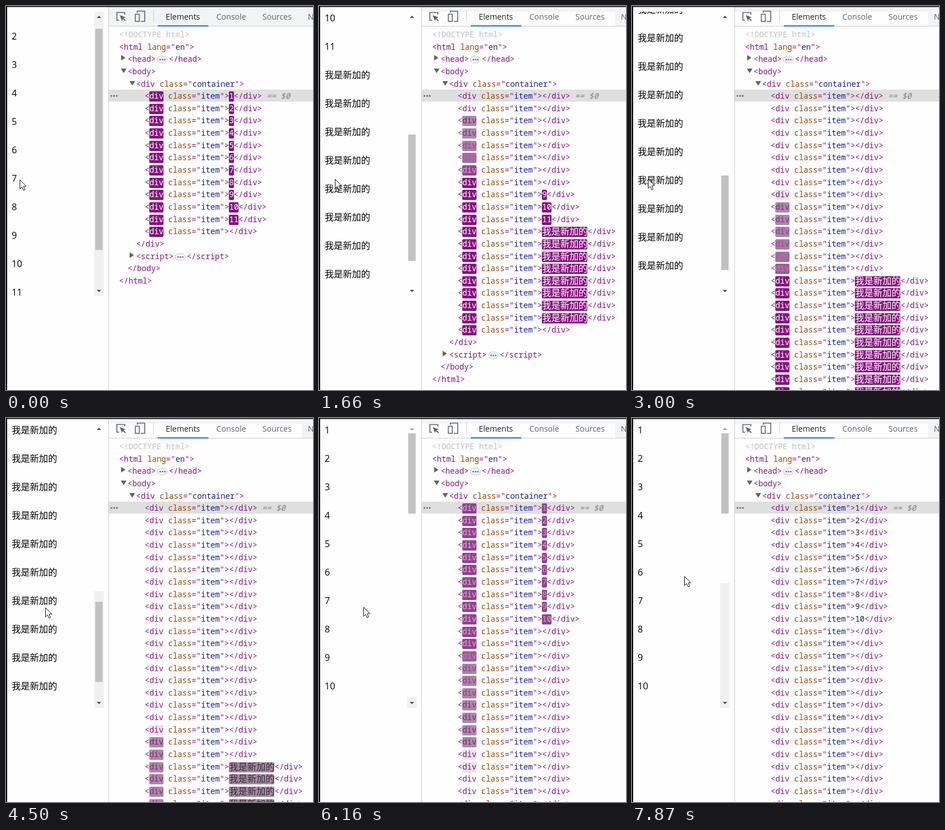
These frames come from a looping animation (540 by 675 pixels, 7.99 s). An HTML page with a canvas:

```html
<!DOCTYPE html>
<html lang="en">
<head>
<meta charset="utf-8">
<style>
html, body { margin: 0; width: 100%; height: 100%; overflow: hidden; background: #fefefe; }
canvas { display: block; }
</style>
</head>
<body>
<canvas id="stage" width="540" height="675"></canvas>
<script>
const ctx = document.getElementById('stage').getContext('2d');
const LOOP = 7990, STEPS = 58, STEP = LOOP / STEPS, FADE = 1250;
const ROW = 21.64, CHAR = 8.25, ITEM = 50, VIEW = 500;
const CJK = '"Noto Sans CJK SC", "Noto Sans CJK JP", "Noto Sans CJK", sans-serif';
const SANS = '"Open Sans", "Noto Sans", ' + CJK;
const MONO = '13.75px "Noto Sans Mono", "DejaVu Sans Mono", monospace';
const PAGE = '#fefefe', TAG = '#881280', ATTR = '#994500', VALUE = '#1a1aa6', INK = '#202124';

// [step, value...] keys, linear in between
const SCROLL = [[0, 18], [2, 110], [12, 450], [18, 750], [21, 815], [22, 905], [25, 1050], [32, 1050],
  [34, 600], [38, 150], [40, 130], [42, 0]];
const POINTER = [[0, 24, 305], [5, 28, 304], [26, 28, 304], [30, 67, 333], [44, 78, 332],
  [49, 408, 167], [56, 123, 290], [57, 92, 278]];
// Top of the painted scrollbar track, held until the next key
const TRACK = [[0, 10], [9, 510], [28, 304], [33, 490], [56, 290]];

function track(keys, k, i = 1) {
  const n = keys.findIndex(key => key[0] > k);
  if (n < 0) return keys[keys.length - 1][i];
  const a = keys[n - 1], b = keys[n];
  return a[i] + (b[i] - a[i]) * (k - a[0]) / (b[0] - a[0]);
}
const hold = (keys, k) => keys.filter(key => key[0] <= k).pop()[1];

// cubic-bezier(0, 0, .2, 1)
function ease(x) {
  if (x <= 0) return 0;
  if (x >= 1) return 1;
  let lo = 0, hi = 1;
  for (let i = 0; i < 20; i++) {
    const u = (lo + hi) / 2;
    if (.6 * u * u * (1 - u) + u * u * u < x) lo = u; else hi = u;
  }
  return lo * lo * (3 - 2 * lo);
}
function mix(a, b, p) {
  const part = (c, i) => parseInt(c.substr(1 + 2 * i, 2), 16);
  return 'rgb(' + [0, 1, 2].map(i => Math.round(part(a, i) + (part(b, i) - part(a, i)) * p)) + ')';
}
const label = n => n <= 11 ? String(n) : '我是新加的';

// State of the virtual list at every step; the rows follow the scroll one step late
function build() {
  const out = [];
  let old = null;
  for (let k = 0; k < STEPS; k++) {
    const scroll = Math.round(track(SCROLL, k));
    const base = k ? old.scroll : scroll;
    const first = Math.floor(base / ITEM) + 1, last = Math.ceil((base + VIEW) / ITEM);
    const count = Math.max(old ? old.count : 0, last + 1);
    const flash = old ? old.flash.slice() : [];
    for (let n = 1; n <= count; n++) {
      const inside = n >= first && n <= last;
      const left = old && n >= old.first && n <= old.last && !inside;
      const added = !old || n > old.count;
      if (added || left || (inside && old.base !== base)) flash[n] = k;
    }
    const total = Math.max(old ? old.total : 0, (Math.floor((scroll + VIEW) / ITEM) + 2) * ITEM);
    out.push(old = { k, scroll, base, first, last, count, flash, total });
  }
  return out;
}
const states = build();

function rect(x, y, w, h, color, r = 0) {
  ctx.fillStyle = color;
  ctx.beginPath();
  ctx.roundRect(x, y, w, h, r);
  ctx.fill();
}
function poly(points, fill, stroke) {
  ctx.beginPath();
  points.forEach(p => ctx.lineTo(p[0], p[1]));
  ctx.closePath();
  if (fill) { ctx.fillStyle = fill; ctx.fill(); }
  if (stroke) { ctx.strokeStyle = stroke; ctx.lineWidth = 1; ctx.stroke(); }
}
function line(points, color, width) {
  ctx.strokeStyle = color;
  ctx.lineWidth = width;
  ctx.beginPath();
  points.forEach(p => ctx.lineTo(p[0], p[1]));
  ctx.stroke();
}
function text(s, x, y, color, font) {
  ctx.font = font;
  ctx.fillStyle = color;
  ctx.fillText(s, x, y);
}
// Draws [string, colour] pairs on one code line and returns the end
function code(x, y, ...parts) {
  for (const [s, color] of parts) {
    text(s, x, y + 5, color, MONO);
    x += s.length * CHAR;
  }
  return x;
}
const lineY = n => Math.round(50 + ROW * n);

function chip(s, x, y, age, ink) {
  const cjk = s.charCodeAt(0) > 255;
  const w = s.length * (cjk ? 16 : CHAR);
  const lit = age < FADE;
  if (lit) {
    ctx.globalAlpha = 1 - ease((age - FADE * .8) / (FADE * .2));
    rect(Math.floor(x), y - 8, Math.ceil(w), 18, mix(TAG, '#a88ca6', ease(age / (FADE * .8))), 2);
    ctx.globalAlpha = 1;
  }
  const color = lit ? mix('#ffffff', ink, ease(age / FADE)) : ink;
  text(s, x, y + (cjk ? 6 : 5), color, cjk ? '16px ' + CJK : MONO);
  return x + w;
}
function arrow(x, y, open) {
  poly(open ? [[x - 5, y - 4], [x + 5, y - 4], [x, y + 4]] : [[x - 3.5, y - 5], [x + 4, y], [x - 3.5, y + 5]], '#626262');
}
function pill(x, y) {
  rect(x, y - 5, 17, 12, '#f1f3f4', 6);
  ctx.strokeStyle = '#c4c6c9';
  ctx.lineWidth = 1;
  ctx.stroke();
  for (let i = 0; i < 3; i++) rect(x + 3.5 + i * 4, y, 2.6, 2.6, '#5f6368', 1.3);
}
function folded(name, x, y) {
  arrow(x - 8, y - 2, false);
  const end = code(x, y, [`<${name}>`, TAG]);
  pill(end + 3, y);
  code(end + 23, y, [`</${name}>`, TAG]);
}
function openDiv(x, y, name, tag) {
  x = tag(code(x, y, ['<', TAG]));
  return code(x, y, [' ', TAG], ['class', ATTR], ['="', TAG], [name, VALUE], ['">', TAG]);
}

function toolbar(k) {
  rect(181, 2, 359, 34, '#f1f3f4');
  if (k >= 9) rect(181, 10, 340, 26, PAGE);
  rect(181, 35, 359, 1, '#cbcdd1');
  const c = '#5f6368';
  line([[199, 25], [195, 25], [195, 11.5], [209, 11.5], [209, 15]], c, 1.6);
  poly([[200, 16], [210.5, 20], [206, 21.5], [204, 26.5]], c);
  line([[205, 21], [210, 26]], c, 1.8);
  line([[231, 12], [231, 9], [244, 9], [244, 27], [237, 27]], c, 1.6);
  ctx.strokeStyle = c;
  ctx.strokeRect(227.5, 14.5, 7, 12.5);
  rect(259, 8, 1, 20, '#cbcdd1');
  [['Elements', 281], ['Console', 370], ['Sources', 451], ['Network', 531]].forEach(([s, x], i) =>
    text(s, x, 24, i ? '#5f6368' : INK, '14px ' + SANS));
  rect(267, 34, 89, 2, '#1a73e8');
}

function tree(st, hover) {
  let n = 0;
  text('<!DOCTYPE html>', 199, lineY(n++) + 5, '#c0c0c0', MONO);
  code(199, lineY(n++), ['<html ', TAG], ['lang', ATTR], ['="', TAG], ['en', VALUE], ['">', TAG]);
  folded('head', 214, lineY(n++));
  arrow(207, lineY(n) - 1, true);
  code(214, lineY(n++), ['<body>', TAG]);
  arrow(222, lineY(n) - 1, true);
  const boxY = lineY(n++);
  openDiv(229, boxY, 'container', x => code(x, boxY, ['div', TAG]));
  rect(181, 147, 359, 21, '#dfdfdf');
  for (let i = 0; i < 3; i++) rect(184 + i * 4.7, 156.5, 3, 3, '#5f6368', 1.5);
  if (hover > 1) rect(185, lineY(4 + hover) - 12, 370, 22, '#e8f1fd', 6);
  for (let i = 1; i <= st.count; i++, n++) {
    const y = lineY(n), age = (st.k - st.flash[i]) * STEP;
    if (y > 690) continue;
    let x = openDiv(244, y, 'item', x => chip('div', x, y, age, TAG));
    if (i >= st.first && i <= st.last) x = chip(label(i), x, y, age, INK);
    x = code(x, y, ['</div>', TAG]);
    if (i === 1) text('== $0', x + CHAR, y + 5, '#808080', 'italic ' + MONO);
  }
  code(229, lineY(n++), ['</div>', TAG]);
  folded('script', 229, lineY(n++));
  code(214, lineY(n++), ['</body>', TAG]);
  code(199, lineY(n), ['</html>', TAG]);
}

function list(st) {
  ctx.save();
  ctx.beginPath();
  ctx.rect(2, 10, 153, VIEW);
  ctx.clip();
  for (let i = st.first; i <= st.last; i++)
    text(label(i), 10, 27 + (i - 1) * ITEM - st.scroll, '#000', '16px ' + SANS);
  ctx.restore();
}
function scrollbar(st) {
  const top = hold(TRACK, st.k);
  rect(155, top, 17, 510 - top, '#f1f1f1');
  const at = s => Math.floor(27 + s * 466 / st.total);
  rect(157, at(st.scroll), 13, at(st.scroll + VIEW) - at(st.scroll), '#c1c1c1');
  poly([[159.5, 21], [167.5, 21], [163.5, 17]], st.scroll > 0 ? '#505050' : '#a3a3a3');
  poly([[159.5, 499], [167.5, 499], [163.5, 503]], '#505050');
}

function inspect(st, n) {
  const y = 10 + (n - 1) * ITEM - st.scroll;
  rect(10, y, 145, ITEM, 'rgba(111,168,220,.66)');
  const below = n === 1;
  const top = below ? y + ITEM + 8 : y - 38;
  const edge = below ? top + 1 : top + 33;
  ctx.save();
  ctx.shadowColor = 'rgba(0,0,0,.35)';
  ctx.shadowBlur = 5;
  ctx.shadowOffsetY = 1;
  rect(10, top, 126, 34, '#fff', 5);
  poly([[18, edge], [38, edge], [28, edge + (below ? -8 : 8)]], '#fff');
  ctx.restore();
  rect(10, top, 126, 34, '#fff', 5);
  const bold = 'bold 12px ' + SANS;
  text('div', 19, top + 21, TAG, bold);
  text('.item', 19 + ctx.measureText('div').width, top + 21, VALUE, bold);
  text('145 × 50', 79, top + 21, '#6b6f74', '12px ' + SANS);
}
function pointer(x, y) {
  const shape = [[0, 0], [0, 16], [3.6, 12.6], [6.2, 18.4], [8.8, 17.2], [6.4, 11.6], [11, 11.3]];
  poly(shape.map(p => [x + .5 + p[0], y + .5 + p[1]]), '#fff', '#111');
}

function draw(t) {
  const st = states[Math.min(STEPS - 1, Math.floor(t / STEP))];
  const x = Math.round(track(POINTER, st.k, 1)), y = Math.round(track(POINTER, st.k, 2));
  const row = Math.floor((y + 4 - 147.5) / ROW) + 1;
  const hover = x > 181 && row > 0 && row <= st.last ? row : 0;
  rect(0, 0, 540, 675, PAGE);
  list(st);
  scrollbar(st);
  if (hover) inspect(st, hover);
  toolbar(st.k);
  tree(st, hover);
  rect(180, 2, 1, 673, '#cbcdd1');
  rect(0, 0, 540, 2, '#38383b');
  rect(0, 0, 2, 675, '#000');
  pointer(x, y);
}

const start = performance.now();
function tick() {
  draw((performance.now() - start) % LOOP);
  requestAnimationFrame(tick);
}
tick();
</script>
</body>
</html>
```
